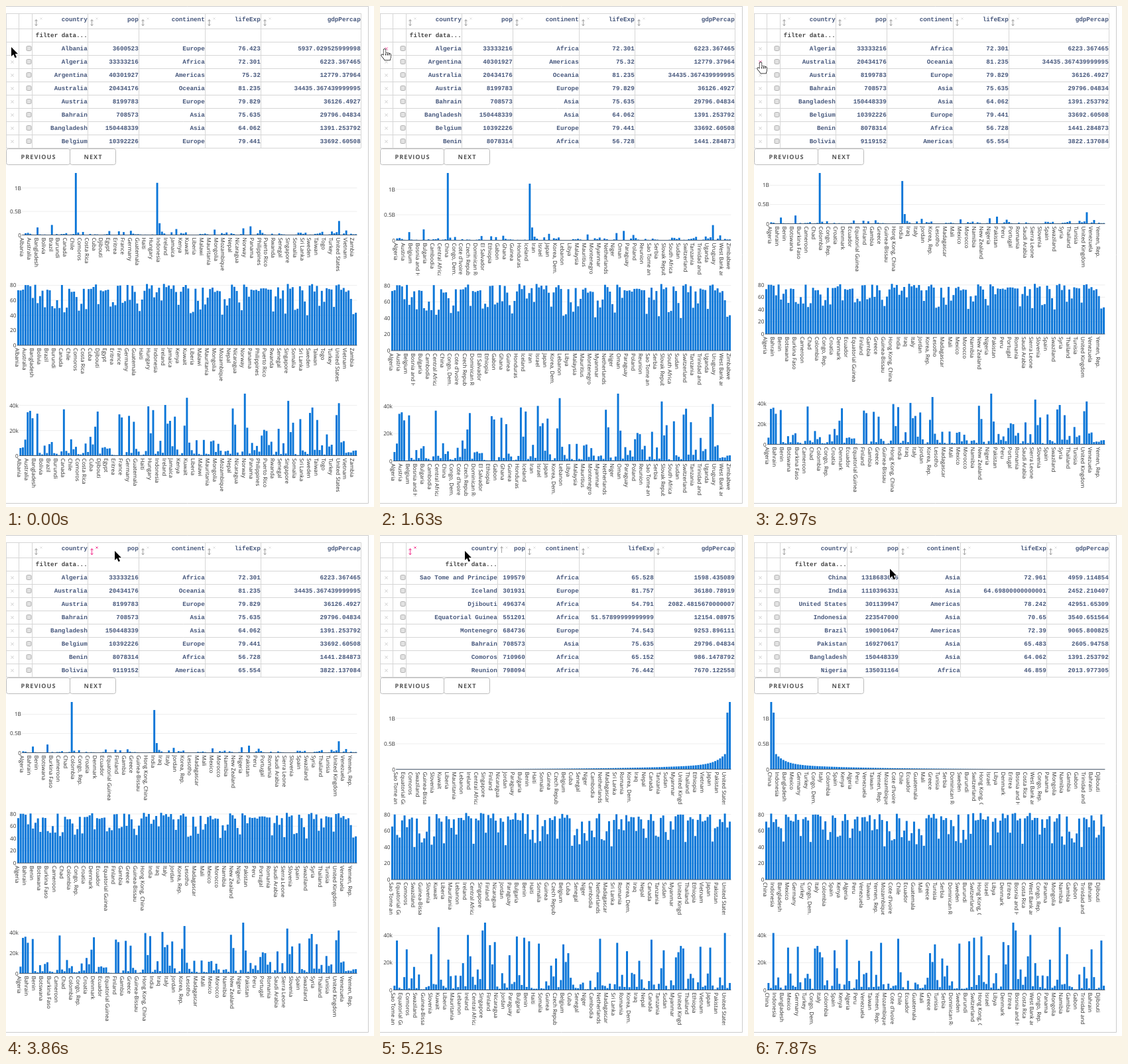
An HTML page with a canvas for the animation above (8000 ms loop, 555 by 756 pixels).

```html
<!DOCTYPE html>
<html lang="en">
<head>
<meta charset="utf-8">
<title>Data table with linked charts</title>
<style>
html, body { margin: 0; width: 100%; height: 100%; overflow: hidden; background: #fff; }
canvas { display: block; }
</style>
</head>
<body>
<canvas id="stage" width="555" height="756"></canvas>
<script>
const ctx = document.getElementById('stage').getContext('2d');
const LOOP = 8000, TICK = 148.5;
const BLUE = '#0b76d8', PINK = '#f43f96', INK = '#46577c', LINE = '#d6d6d6';
const MONO = 'bold 9.28px "Liberation Mono", monospace';
const SANS = '8.2px "Open Sans", sans-serif';

const split = text => text.split(/[|\n]/);

// From the smallest to the largest population
const BY_SIZE = split(`Sao Tome and Principe|Iceland|Djibouti|Equatorial Guinea|Montenegro|Bahrain|Comoros|Reunion|Trinidad and Tobago|Swaziland
Mauritius|Gabon|Guinea-Bissau|Botswana|Gambia|Slovenia|Lesotho|Namibia|Kuwait|Jamaica
Mongolia|Liberia|Oman|Panama|Mauritania|Uruguay|Albania|Congo, Rep.|Lebanon|Puerto Rico
West Bank and Gaza|Ireland|New Zealand|Costa Rica|Central African Republic|Croatia|Bosnia and Herzegovina|Singapore|Norway|Eritrea
Finland|Slovak Republic|Denmark|Nicaragua|Togo|Libya|Jordan|Sierra Leone|Israel|Paraguay
El Salvador|Hong Kong, China|Bulgaria|Honduras|Switzerland|Benin|Austria|Burundi|Haiti|Rwanda
Sweden|Somalia|Bolivia|Dominican Republic|Guinea|Hungary|Serbia|Czech Republic|Chad|Tunisia
Belgium|Portugal|Greece|Cuba|Zambia|Mali|Senegal|Zimbabwe|Guatemala|Niger
Malawi|Ecuador|Cambodia|Burkina Faso|Chile|Netherlands|Cameroon|Cote d'Ivoire|Madagascar|Syria
Mozambique|Sri Lanka|Australia|Yemen, Rep.|Romania|Ghana|Taiwan|Korea, Dem. Rep.|Malaysia|Venezuela
Iraq|Saudi Arabia|Peru|Nepal|Uganda|Algeria|Canada|Morocco|Kenya|Tanzania
Poland|Argentina|Spain|Sudan|South Africa|Colombia|Myanmar|Korea, Rep.|Italy|United Kingdom
France|Congo, Dem. Rep.|Thailand|Iran|Turkey|Ethiopia|Egypt|Germany|Vietnam|Philippines
Mexico|Japan|Nigeria|Bangladesh|Pakistan|Brazil|Indonesia|United States|India|China`);

// High and middle incomes, richest first; low incomes, shortest lives first
const HIGH = split(`Norway|Kuwait|Singapore|United States|Ireland|Hong Kong, China|Switzerland|Netherlands|Canada|Iceland
Austria|Denmark|Australia|Sweden|Belgium|Finland|United Kingdom|Germany|Japan|France
Bahrain|Spain|Taiwan|Italy|Greece|Slovenia|Israel|New Zealand|Korea, Rep.|Czech Republic
Oman|Saudi Arabia|Portugal|Puerto Rico|Slovak Republic|Hungary|Trinidad and Tobago|Poland|Croatia`);
const MIDDLE = split(`Chile|Argentina|Malaysia|Libya|Mexico|Iran|Venezuela|Mauritius|Romania|Bulgaria
Uruguay|Lebanon|Panama|Serbia|Costa Rica|Montenegro|Brazil|Cuba|Turkey|Reunion
Thailand|Bosnia and Herzegovina|Peru|Jamaica|Tunisia|Colombia|Ecuador|Algeria|Dominican Republic|Albania
El Salvador|Egypt|Guatemala|China|Jordan|Syria|Paraguay|Sri Lanka|Morocco|Honduras
Indonesia|Philippines|Mongolia|West Bank and Gaza|Nicaragua|Vietnam|Korea, Dem. Rep.`);
const LOW = split(`Swaziland|Mozambique|Zambia|Sierra Leone|Lesotho|Zimbabwe|Central African Republic|Liberia|Rwanda|Guinea-Bissau
Congo, Dem. Rep.|Nigeria|Somalia|Malawi|Cote d'Ivoire|South Africa|Burundi|Cameroon|Chad|Botswana
Uganda|Equatorial Guinea|Burkina Faso|Tanzania|Namibia|Ethiopia|Kenya|Mali|Djibouti|Congo, Rep.
Guinea|Benin|Gabon|Niger|Eritrea|Togo|Sudan|Gambia|Madagascar|Iraq
Cambodia|Ghana|Haiti|Myanmar|Yemen, Rep.|Senegal|Nepal|Bangladesh|Mauritania|India
Comoros|Pakistan|Sao Tome and Principe|Bolivia`);

const noise = n => { const s = Math.sin(n * 12.99 + 4) * 43758.5; return s - Math.floor(s); };

// Years of life and thousands per head; r runs from 0 to 1 along a group
const GROUPS = [
  [HIGH, (r, i) => ({ life: 81 - 6 * r * r + 2 * noise(i) - 1,
    gdp: 38 - 23 * r ** 1.6 + 11.4 * Math.exp(-i / 3) })],
  [MIDDLE, (r, i) => ({ life: 75.5 - 4 * r + 4 * noise(i) - 2, gdp: 13 - 11 * r })],
  [LOW, (r, i) => ({ life: 40 + 25.6 * r ** .85, gdp: .4 + 4.5 * noise(i) ** 2 })]];
const stats = {};
for (const [names, rule] of GROUPS)
  names.forEach((name, i) => stats[name] = rule(i / (names.length - 1), i));

// Billions: exponential growth with rank, steeper at the top, then two giants
const popAt = rank => ({ 138: 1.11, 139: 1.319 })[rank] ??
  .0016 * Math.exp(.03 * rank) + .2 * Math.exp((rank - 137) / 4);

const all = BY_SIZE.map((name, rank) => ({ name, pop: popAt(rank), ...stats[name] }));
const byName = [...all].sort((a, b) => a.name < b.name ? -1 : 1);
const without = (list, ...gone) => list.filter(c => !gone.includes(c.name));
const rising = without(all, 'Albania', 'Argentina');

// [tick, countries, zero line of the first chart]
const CHART_STATES = [
  [0, byName, 345.5],
  [11, without(byName, 'Albania'), 353.5],
  [20, without(byName, 'Albania', 'Argentina'), 328.5],
  [35, rising, 353.5],
  [45, [...rising].reverse(), 353.5]];

const CHARTS = [
  { key: 'pop', left: 24.1, max: 1.3187, ticks: [[0, '0'], [.5, '0.5B'], [1, '1B']] },
  { key: 'life', left: 16.6, max: 82.6, ticks: [0, 20, 40, 60, 80].map(v => [v, '' + v]) },
  { key: 'gdp', left: 20, max: 49.36, ticks: [[0, '0'], [20, '20k'], [40, '40k']] }];

const rows = text => text.split('\n').map(r => r.split('|'));
const ALPHA = rows(`Albania|3600523|Europe|76.423|5937.029525999998
Algeria|33333216|Africa|72.301|6223.367465
Argentina|40301927|Americas|75.32|12779.37964
Australia|20434176|Oceania|81.235|34435.367439999995
Austria|8199783|Europe|79.829|36126.4927
Bahrain|708573|Asia|75.635|29796.04834
Bangladesh|150448339|Asia|64.062|1391.253792
Belgium|10392226|Europe|79.441|33692.60508
Benin|8078314|Africa|56.728|1441.284873
Bolivia|9119152|Americas|65.554|3822.137084`);
const SMALLEST = rows(`Sao Tome and Principe|199579|Africa|65.528|1598.435089
Iceland|301931|Europe|81.757|36180.78919
Djibouti|496374|Africa|54.791|2082.4815670000007
Equatorial Guinea|551201|Africa|51.57899999999999|12154.08975
Montenegro|684736|Europe|74.543|9253.896111
Bahrain|708573|Asia|75.635|29796.04834
Comoros|710960|Africa|65.152|986.1478792
Reunion|798094|Africa|76.442|7670.122558`);
const LARGEST = rows(`China|1318683096|Asia|72.961|4959.114854
India|1110396331|Asia|64.69800000000001|2452.210407
United States|301139947|Americas|78.242|42951.65309
Indonesia|223547000|Asia|70.65|3540.651564
Brazil|190010647|Americas|72.39|9065.800825
Pakistan|169270617|Asia|65.483|2605.94758
Bangladesh|150448339|Asia|64.062|1391.253792
Nigeria|135031164|Africa|46.859|2013.977305`);
const HEADS = ['country', 'pop', 'continent', 'lifeExp', 'gdpPercap'];

// [tick, rows, column edges, sort direction of pop]
const EDGES = [39, 123, 200, 300, 384, 535];
const TABLE_STATES = [
  [0, ALPHA, EDGES, 0],
  [9, ALPHA.slice(1), EDGES, 0],
  [17, ALPHA.filter((r, i) => i != 0 && i != 2), EDGES, 0],
  [33, SMALLEST, [39, 177, 219, 300, 413, 535], 1],
  [43, LARGEST, [39, 140, 218, 311, 441, 535], -1]];

// Pointer path: [tick, x, y]
const PATH = [
  [0, 8, 62], [3, 8, 62], [5, 7, 65], [12, 7, 65], [15, 10, 85], [21, 10, 85],
  [25, 155, 16], [26, 164, 24], [29, 130, 26], [31, 128, 26], [34, 128, 26], [35, 128, 24],
  [36, 128, 24], [40, 190, 28], [41, 183, 26], [43, 183, 26], [44, 182, 24], [47, 182, 24],
  [49, 165, 58], [51, 165, 58], [53, 205, 51], [54, 205, 51]];
const ARROW = new Path2D('M0 0V14L3.2 11L5.6 16.2L8 15.2L5.7 10.2H10Z');
const HAND = new Path2D('M-1.5 1Q0-1 1.5 1V6Q3 5 4.5 6.3Q6 5.6 7 7Q9 6.6 9.3 8.5V12Q8.5 14 8 16.5H0' +
  'Q-1.5 13.5-4.5 10.5Q-5.5 8-3.5 8.2L-1.5 9.7Z');

const at = (states, tick) => states.findLast(s => s[0] <= tick);
const rowY = r => 64 + 20 * r;

function pointerAt(tick) {
  const a = at(PATH, tick), b = PATH[PATH.indexOf(a) + 1] ?? a;
  const f = a == b ? 0 : (tick - a[0]) / (b[0] - a[0]);
  const x = a[1] + (b[1] - a[1]) * f, y = a[2] + (b[2] - a[2]) * f;
  // Hovering follows a new layout one tick late
  const edges = at(TABLE_STATES, Math.max(0, tick - 1))[2];
  const col = y > 11 && y < 34 ? edges.findLastIndex(e => e <= x) : -1;
  const row = Math.round((y - 64) / 20);
  const onCross = x < 19 && Math.abs(y - rowY(row) - 1) < 3;
  const onIcon = col >= 0 && x - edges[col] < 14;
  return { x, y, col, row: onCross ? row : -1, hand: onCross || onIcon };
}

function text(str, x, y, font, color, align = 'right') {
  ctx.font = font;
  ctx.fillStyle = color;
  ctx.textAlign = align;
  ctx.fillText(str, x, y);
}

function line(color, ...points) {
  ctx.strokeStyle = color;
  ctx.lineWidth = 1;
  ctx.beginPath();
  points.forEach(([x, y]) => ctx.lineTo(x, y));
  ctx.stroke();
}

function box(x, y, w, h, radius, stroke, fill) {
  ctx.beginPath();
  ctx.roundRect(x, y, w, h, radius);
  ctx.fillStyle = fill;
  ctx.fill();
  ctx.strokeStyle = stroke;
  ctx.lineWidth = 1;
  ctx.stroke();
}

function cross(x, y, r, color) {
  line(color, [x - r, y - r], [x + r, y + r]);
  line(color, [x - r, y + r], [x + r, y - r]);
}

// dir: 1 up, -1 down, 0 both
function sortIcon(x, dir, color) {
  const top = dir ? 17.5 : 20.5, end = dir ? 27 : 30;
  line(color, [x, top], [x, end]);
  if (dir >= 0) line(color, [x - 2, top + 2.5], [x, top], [x + 2, top + 2.5]);
  if (dir <= 0) line(color, [x - 2, end - 2.5], [x, end], [x + 2, end - 2.5]);
}

function drawTable(tick, pointer) {
  const [, data, edges, dir] = at(TABLE_STATES, tick);
  for (const y of [11, 34, ...Array.from({ length: 9 }, (_, i) => 54 + 20 * i)])
    line(LINE, [0, y + .5], [535.5, y + .5]);
  for (const x of [0, 19, ...edges]) line(LINE, [x + .5, 11], [x + .5, 214]);

  HEADS.forEach((head, i) => {
    const x = edges[i] + 6.5, hot = i == pointer.col;
    text(head, edges[i + 1] - .3, 22.5, MONO, INK);
    sortIcon(x, i == 1 ? dir : 0, hot ? PINK : '#a5a5a5');
    cross(x + 7.5, 19, 1.5, hot ? PINK : '#e2e2e2');
  });
  text('filter data...', edges[1] - .3, 47, MONO, '#444');

  data.slice(0, 8).forEach((row, r) => {
    const y = rowY(r);
    cross(9.5, y + .5, 2, r == pointer.row ? PINK : '#c8c8c8');
    box(31, y - 3.5, 7, 7, 1.5, '#b0b0b0', '#e2e2e2');
    row.forEach((cell, i) => text(cell, edges[i + 1] - .3, y + 3, MONO, INK));
  });
}

function drawButton(label, x, w) {
  box(x + .5, 215.5, w, 24, 3, '#bbb', '#fff');
  ctx.letterSpacing = '1px';
  text(label, x + w / 2 + 1, 231.3, 'bold 9.1px "Open Sans", sans-serif', '#555', 'center');
  ctx.letterSpacing = '0px';
}

function drawChart({ key, left, max, ticks }, n, countries, firstBase) {
  const right = 529.4, shift = 166.5 * n;
  const base = firstBase + shift, scale = (base - 252 - shift) / max;
  const pitch = (right - left) / countries.length;
  for (const [value, label] of ticks) {
    const y = base - value * scale;
    if (value) line('#eee', [left, y], [right, y]);
    text(label, left - 1.2, y + 3, SANS, '#333');
  }
  ctx.fillStyle = BLUE;
  countries.forEach((c, i) =>
    ctx.fillRect(left + pitch * (i + .1), base, pitch * .8, -c[key] * scale));
  line('#4a5a6c', [left, base], [right, base]);

  ctx.save();
  ctx.beginPath();
  ctx.rect(0, base, 555, 406.5 + shift - base);
  ctx.clip();
  for (let i = 0; i < countries.length; i += 3) {
    ctx.save();
    ctx.translate(left + pitch * (i + .5) - 4.6, base + 4);
    ctx.rotate(Math.PI / 2);
    text(countries[i].name, 0, 0, SANS, '#2a2a2a', 'left');
    ctx.restore();
  }
  ctx.restore();
}

function drawPointer({ x, y, hand }) {
  const shape = hand ? HAND : ARROW;
  ctx.save();
  ctx.translate(x, y);
  ctx.lineJoin = 'round';
  ctx.lineWidth = hand ? 1.3 : 1.6;
  ctx.strokeStyle = hand ? '#000' : '#fff';
  ctx.fillStyle = hand ? '#fff' : '#000';
  ctx.stroke(shape);
  ctx.fill(shape);
  if (hand) for (const fx of [1.7, 4.4, 6.9]) line('#000', [fx, 6.5], [fx, 9.5]);
  ctx.restore();
}

function draw(now) {
  const tick = Math.floor((now % LOOP + 6) / TICK), pointer = pointerAt(tick);
  const [, countries, base] = at(CHART_STATES, tick);
  ctx.textRendering = 'geometricPrecision';
  ctx.fillStyle = '#fff';
  ctx.fillRect(0, 0, 555, 756);
  line('#ccc', [0, .5], [546.5, .5], [546.5, 750.5], [0, 750.5]);
  drawTable(tick, pointer);
  drawButton('PREVIOUS', 0, 96);
  drawButton('NEXT', 96, 69);
  CHARTS.forEach((chart, n) => drawChart(chart, n, countries, base));
  drawPointer(pointer);
}

const start = performance.now();
function frame() {
  draw(performance.now() - start);
  requestAnimationFrame(frame);
}
frame();
</script>
</body>
</html>
```
